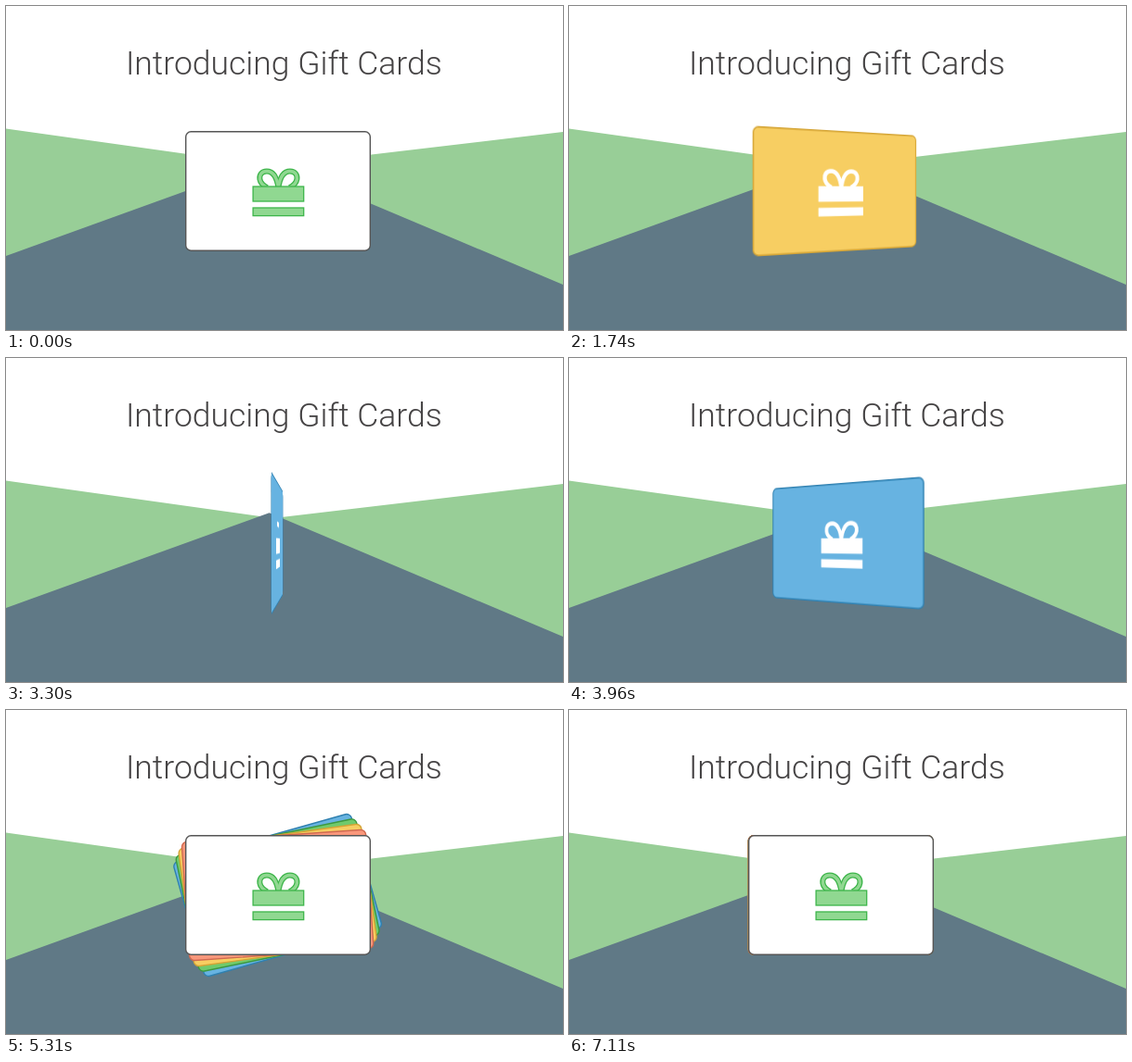
Recreate the animation shown at these times as an HTML page. Size 600 px wide and 350 px high, loop 7500 ms.

```html
<!DOCTYPE html>
<html lang="en">
<head>
<meta charset="utf-8">
<title>Introducing Gift Cards</title>
<style>
  html, body { margin: 0; width: 100%; height: 100%; overflow: hidden; background: #fff; }
  .stage { position: absolute; left: 0; top: 0; width: 600px; height: 350px; overflow: hidden; }
  .stage > svg { position: absolute; left: 0; top: 0; }
  .title { font: 300 35.5px Roboto, "Open Sans", sans-serif; fill: #464445; text-anchor: middle; }
  .card { position: absolute; left: 193px; top: 135px; width: 200px; height: 130px; }
  .card svg { display: block; overflow: visible; }
</style>
</head>
<body>
<div class="stage" id="stage">
  <svg width="600" height="350">
    <path fill="#98ce97" d="M0 132.5L288 173.1L600 136V350H0z"/>
    <path fill="#607986" d="M0 270L283.6 167.2L600 301V350H0z"/>
    <text class="title" x="299.3" y="74">Introducing Gift Cards</text>
  </svg>
</div>
<script>
const LOOP = 7500, TICK = 30, STEPS_PER_TICK = 0.8;
const SPIN_END = 125, DEG_PER_STEP = 7.2;
const FAN_START = 134, FAN_PEAK = 155, FAN_END = 189, FAN_ANGLE = 31.5;

const LOOP_PATH = 'M0 -4C-1.5 -14 -5.5 -21.7 -12.5 -21.7C-18.5 -21.7 -20.6 -17.2 -20 -13.2C-19.4 -9.2 -16 -6 -12 -4';
const bow = (color, width) =>
  ['', 'scale(-1 1)'].map(flip =>
    `<path transform="${flip}" d="${LOOP_PATH}" fill="none" stroke="${color}" stroke-width="${width}"/>`).join('');
const boxes = attrs =>
  `<g ${attrs}><rect x="-27.3" y="-5.2" width="54.6" height="16"/><rect x="-27.3" y="17.8" width="54.6" height="8.6"/></g>`;

const outlinedGift = bow('#3db54a', 6) + bow('#90d891', 3.4) + boxes('fill="#90d891" stroke="#3db54a" stroke-width="1.3"');
const solidGift = bow('#fff', 4.7) + boxes('fill="#fff" stroke="#fff" stroke-width=".6"');

function makeCard(fill, edge, gift) {
  const card = document.createElement('div');
  card.className = 'card';
  card.innerHTML = `<svg width="200" height="130" viewBox="-100 -65 200 130">
    <rect x="-99.3" y="-64.2" width="198.6" height="128.4" rx="5.5" fill="${fill}" stroke="${edge}" stroke-width="1.4"/>
    <g transform="translate(.4 .2)">${gift}</g></svg>`;
  return card;
}

// In order of appearance; the first one lies on top of the stack.
const cards = [
  makeCard('#fff', '#555', outlinedGift),
  makeCard('#f9977b', '#d06a50', solidGift),
  makeCard('#f7ce62', '#d4a435', solidGift),
  makeCard('#70ca6c', '#3c983f', solidGift),
  makeCard('#67b3e1', '#2f80b0', solidGift),
];
[...cards].reverse().forEach(card => stage.append(card));

function spin(step) {
  const angle = step * DEG_PER_STEP;
  const turn = Math.round(angle / 180);
  cards.forEach((card, i) => {
    card.style.visibility = i === turn % cards.length ? 'visible' : 'hidden';
    card.style.transform = `perspective(600px) rotateY(${turn * 180 - angle}deg)`;
  });
}

function fanSpread(step) {
  if (step <= FAN_START || step >= FAN_END) return 0;
  const end = step < FAN_PEAK ? FAN_START : FAN_END;
  return FAN_ANGLE * Math.sin(Math.PI / 2 * (step - end) / (FAN_PEAK - end));
}

function fan(step) {
  const spread = fanSpread(step);
  cards.forEach((card, i) => {
    card.style.visibility = 'visible';
    card.style.transform = i ? `translateX(-.4px) rotate(${-spread * i / 4}deg)` : 'none';
  });
}

function draw() {
  const tick = Math.floor(performance.now() % LOOP / TICK);
  const step = Math.floor(tick * STEPS_PER_TICK + 1e-6);
  (step <= SPIN_END ? spin : fan)(step);
  requestAnimationFrame(draw);
}
draw();
</script>
</body>
</html>
```
